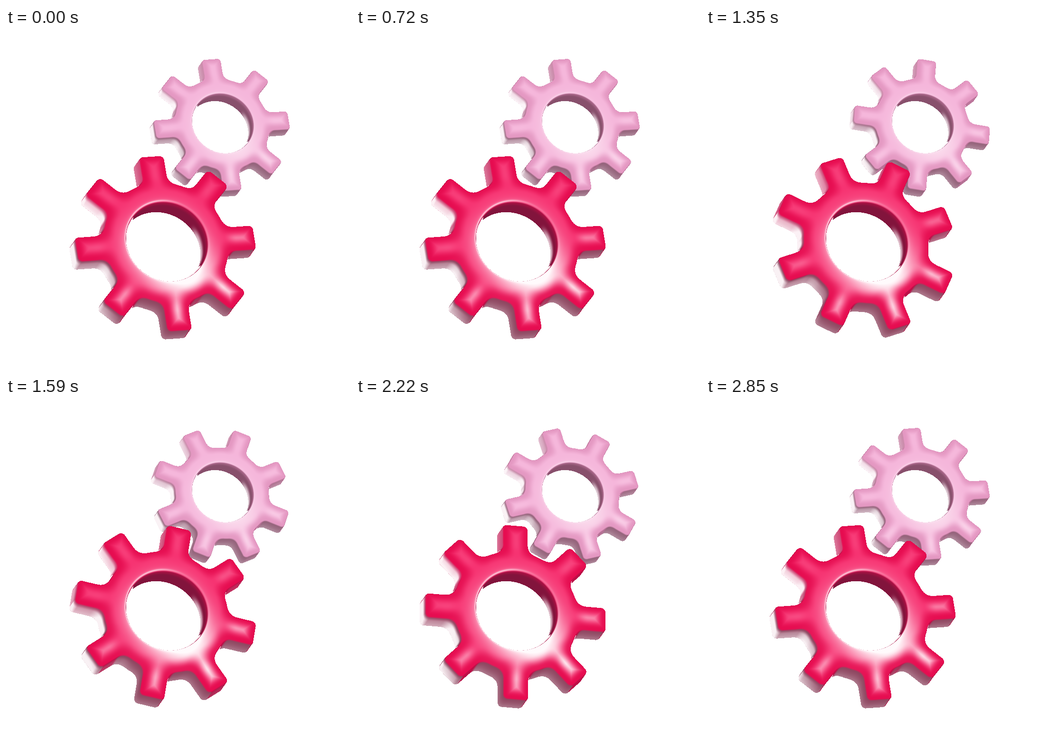
Write an HTML page with a canvas that moves like this. It is 724 by 718 pixels and loops after 2880 ms.

```html
<!DOCTYPE html>
<html lang="en">
<head>
<meta charset="utf-8">
<title>Gears</title>
<style>
  html, body { margin: 0; width: 724px; height: 718px; overflow: hidden; background: #fff; }
  canvas { display: block; }
</style>
</head>
<body>
<canvas id="stage" width="724" height="718"></canvas>
<script>
const W = 724, H = 718;
const ctx = document.getElementById('stage').getContext('2d');

// View basis in gear space: right, down, towards the viewer
const VX = [0.959, 0.155, 0.242];
const VY = [-0.064, 0.938, -0.343];
const VZ = [-0.28, 0.31, 0.908];

const DEPTH = 0.385;  // thickness at the hub
const BULGE = 0.06;   // how far the hub stands above the teeth
const ROUND = 0.055;  // edge rounding
const HOLE = 0.455, BODY = 0.7, TIP = 1.01, TOOTH = 0.141, CORNER = 0.05, FILLET = 0.1;
const S8 = Math.sin(Math.PI / 8), C8 = Math.cos(Math.PI / 8);
const WHITE = [255, 250, 252];

const gears = [
  { x: 457.5, y: 199.3, size: 146, dir: -1, shine: 0.42,
    face: [245, 181, 218], edge: [228, 152, 194], deep: [186, 114, 152],
    mauve: [146, 96, 120], rose: [200, 136, 168], dark: [136, 80, 108] },
  { x: 340, y: 448, size: 194, dir: 1, shine: 0.9,
    face: [246, 46, 110], edge: [230, 12, 80], deep: [188, 14, 70],
    mauve: [140, 68, 94], rose: [206, 72, 118], dark: [130, 20, 60] }
];

const clamp = v => v < 0 ? 0 : v > 1 ? 1 : v;
const smooth = (a, b, v) => { const t = clamp((v - a) / (b - a)); return t * t * (3 - 2 * t); };
const mix = (a, b, t) => [a[0] + (b[0] - a[0]) * t, a[1] + (b[1] - a[1]) * t, a[2] + (b[2] - a[2]) * t];
const bell = v => Math.exp(-v * v);

let cosR = 1, sinR = 0;

// Distance to the toothed outline, folded into one sixteenth of the wheel
function outline(px, py) {
  let x = Math.abs(px * cosR + py * sinR);
  let y = Math.abs(py * cosR - px * sinR);
  if (y > x) { const s = x; x = y; y = s; }
  const over = y * C8 - x * S8;
  if (over > 0) { x += 2 * over * S8; y -= 2 * over * C8; }
  const body = Math.sqrt(x * x + y * y) - BODY;
  const dx = x - TIP + CORNER, dy = Math.abs(y) - TOOTH + CORNER;
  const ox = dx > 0 ? dx : 0, oy = dy > 0 ? dy : 0;
  const tooth = Math.min(Math.max(dx, dy), 0) + Math.sqrt(ox * ox + oy * oy) - CORNER;
  const h = Math.max(FILLET - Math.abs(body - tooth), 0) / FILLET;
  return Math.min(body, tooth) - h * h * FILLET / 4;
}

function profile(x, y) {
  return Math.max(outline(x, y), HOLE - Math.sqrt(x * x + y * y));
}

// Signed height above the front or below the back, plus the rounding
function slab(x, y, w) {
  const drop = BULGE * smooth(0.48, 0.84, Math.sqrt(x * x + y * y));
  return Math.max(w + drop, -w - DEPTH) + ROUND;
}

function solid(x, y, w) {
  const a = profile(x, y) + ROUND, b = slab(x, y, w);
  const pa = a > 0 ? a : 0, pb = b > 0 ? b : 0;
  return Math.min(Math.max(a, b), 0) + Math.sqrt(pa * pa + pb * pb) - ROUND;
}

function normal(x, y, w) {
  const e = 0.002;
  const a = profile(x, y) + ROUND, b = slab(x, y, w);
  if (a <= 0 && b >= a) return [0, 0, 1];
  let gx = profile(x + e, y) - profile(x - e, y);
  let gy = profile(x, y + e) - profile(x, y - e);
  const g = Math.hypot(gx, gy) || 1;
  gx /= g; gy /= g;
  if (b <= 0) return [gx, gy, 0];
  const len = Math.hypot(a, b) || 1;
  return [gx * a / len, gy * a / len, (w > -DEPTH / 2 ? b : -b) / len];
}

function outerWall(g, x, y, depth, nz, vx, vy) {
  const left = Math.max(0, -vx);
  const side = smooth(0.1, 0.7, -x - Math.max(0, y) * 0.5);
  const lit = side * (0.3 + 0.7 * left) * smooth(0.2, 0.52, depth) * smooth(-0.4, 0, vy);
  const pale = clamp(lit + 0.4 * depth * depth) * (1 - 0.65 * smooth(-0.05, -0.6, nz));
  const shade = mix(mix(g.mauve, g.rose, smooth(0.2, -0.5, y)), WHITE, pale * 0.95);
  return mix(g.deep, shade, smooth(0, 0.4, 0.7 * (vy - vx)));
}

function holeWall(g, x, r, depth) {
  const base = mix(g.dark, g.deep, smooth(0.4, 0, depth) * 0.8);
  return mix(base, WHITE, 0.75 * smooth(0.82, 0.99, x / r) * smooth(0.45, 0.85, depth));
}

function frontFace(g, x, y, r) {
  const d = -outline(x, y);
  const base = mix(g.edge, g.face, smooth(0.02, 0.13, d));
  const pool = Math.exp(-(((x - 0.22) / 0.46) ** 2) - ((y - 0.52) / 0.3) ** 2);
  const low = smooth(-0.8, 0.7, (y - x * 0.3) / r);
  const hug = Math.exp(-Math.max(0, r - 0.47) / 0.09) * (0.2 + 0.4 * low);
  const stripe = bell((d - 0.15) / 0.055) * smooth(0.64, 0.8, r) * (0.08 + 0.42 * smooth(-0.5, 0.6, y + 0.3 * x));
  return mix(base, WHITE, clamp((pool * 0.8 * smooth(0.03, 0.16, d) + hug + stripe) * g.shine));
}

function shade(g, x, y, w) {
  const n = normal(x, y, w), r = Math.hypot(x, y);
  const depth = clamp(-w / DEPTH);
  const face = frontFace(g, x, y, r);
  if (n[2] > 0.995) return face;
  if (r < 0.56) {
    const c = mix(holeWall(g, x, r, depth), face, smooth(0.2, 0.6, n[2]));
    const rim = bell((n[2] - 0.7) / 0.14) * (0.15 + 0.6 * smooth(0.7, -0.3, x / r));
    return mix(c, WHITE, rim * g.shine);
  }
  const vx = n[0] * VX[0] + n[1] * VX[1] + n[2] * VX[2];
  const vy = n[0] * VY[0] + n[1] * VY[1] + n[2] * VY[2];
  return mix(outerWall(g, x, y, depth, n[2], vx, vy), face, smooth(0.15, 0.65, n[2]));
}

function paint(data, g, turn) {
  cosR = Math.cos(turn * g.dir);
  sinR = Math.sin(turn * g.dir);
  const reach = g.size * 1.14;
  for (let sy = Math.floor(g.y - reach); sy < g.y + reach; sy++) {
    for (let sx = Math.floor(g.x - reach); sx < g.x + reach; sx++) {
      const u = (sx + 0.5 - g.x) / g.size, v = (sy + 0.5 - g.y) / g.size;
      const s = -(u * VX[2] + v * VY[2]) / VZ[2];
      let x = u * VX[0] + v * VY[0] + s * VZ[0];
      let y = u * VX[1] + v * VY[1] + s * VZ[1];
      let w = 0, t = 0, hit = false;
      for (let i = 0; i < 40 && t < 0.45; i++) {
        const d = solid(x, y, w) * 0.96;
        if (d < 0.0015) { hit = true; break; }
        x -= d * VZ[0]; y -= d * VZ[1]; w -= d * VZ[2];
        t += d;
      }
      if (!hit) continue;
      const c = shade(g, x, y, w), p = (sy * W + sx) * 4;
      data[p] = c[0]; data[p + 1] = c[1]; data[p + 2] = c[2];
    }
  }
}

// Eight equal teeth at 4.5 degrees a step: ten poses repeat
const poses = [];
function pose(i) {
  if (!poses[i]) {
    const img = ctx.createImageData(W, H);
    img.data.fill(255);
    for (const g of gears) paint(img.data, g, i * Math.PI / 40);
    poses[i] = img;
  }
  return poses[i];
}

const STEP = 30, COUNT = 96, TURN = 81;
const start = performance.now();
let shown = -1;
function draw() {
  const n = Math.floor((performance.now() - start) / STEP) % COUNT;
  const i = Math.floor(n * TURN / COUNT) % 10;
  if (i !== shown) {
    ctx.putImageData(pose(i), 0, 0);
    shown = i;
  }
  requestAnimationFrame(draw);
}
draw();
</script>
</body>
</html>
```
